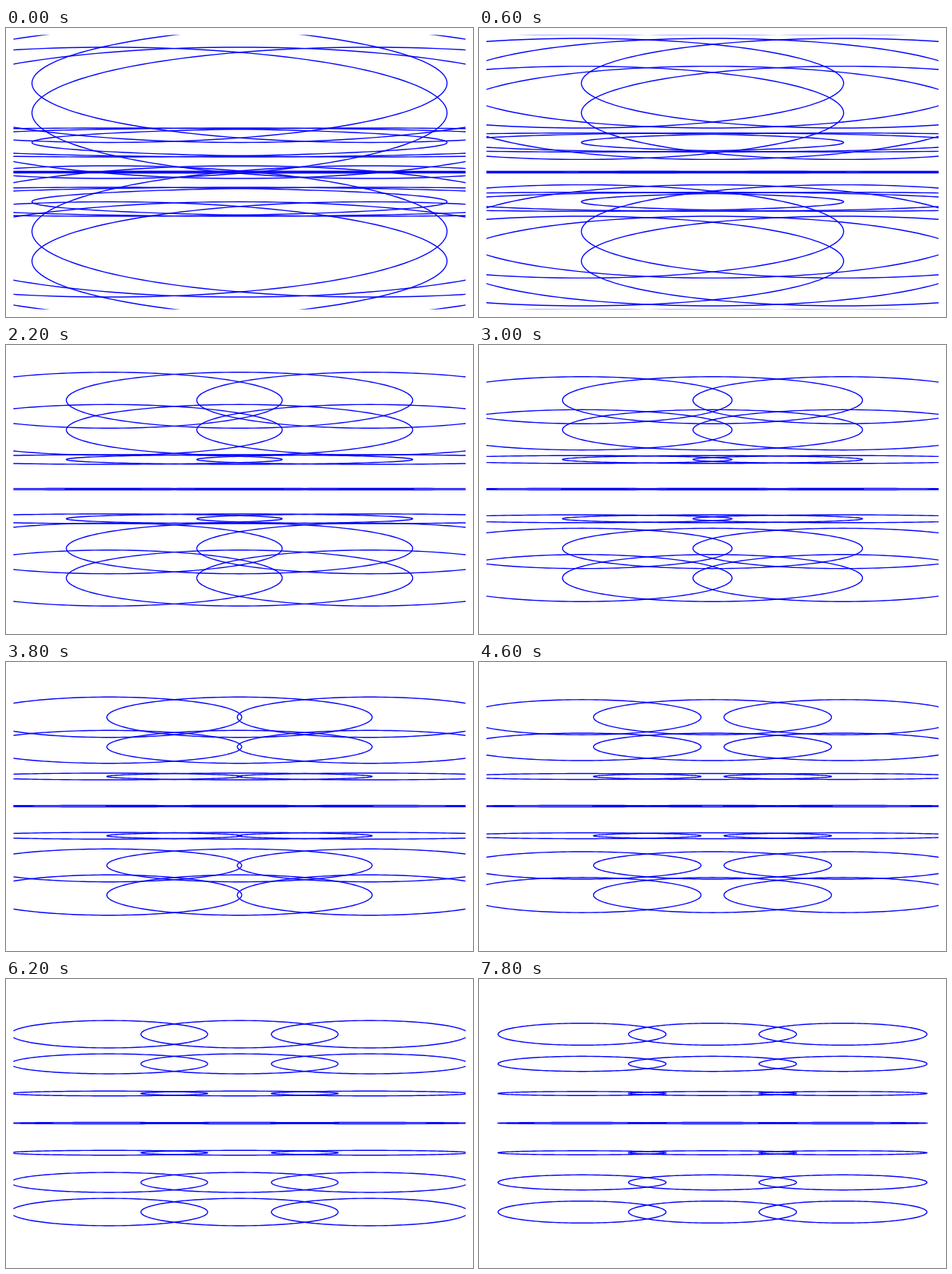
These frames come from a looping animation (630 by 390 pixels, 8 s). An HTML page with a canvas:

```html
<!DOCTYPE html>
<html lang="en">
<head>
<meta charset="utf-8">
<title>Ellipses</title>
<style>
  html, body { margin: 0; width: 100%; height: 100%; overflow: hidden; background: #fff; }
  canvas { display: block; }
</style>
</head>
<body>
<canvas id="stage" width="630" height="390"></canvas>
<script>
const ctx = document.getElementById('stage').getContext('2d');
const STEP = 200, STEPS = 40, SIDES = 160;
const CENTER = { x: 315, y: 194.5 }, GAP = { x: 176, y: 40 };

// Shared horizontal radius: its reciprocal grows almost linearly.
const radiusX = n =>
  1000 / (2.193 + 0.149 * n + 0.0002 * n * n + 0.52 * (1 - Math.exp(-n / 6.5)));

// Height to width ratio, by distance from the middle row.
const flatness = [
  n => 1 / radiusX(n),
  n => 0.024 + 0.0188 * Math.exp(-n / 7),
  n => 1 / (5.15 + 0.153 * n),
  n => 0.1753 * Math.exp(-0.0075 * n)
];

// Straight sides with mitred corners give the flat ellipses pointed tips.
function ellipse(cx, cy, rx, ry) {
  ctx.beginPath();
  for (let i = 0; i < SIDES; i++) {
    const angle = 2 * Math.PI * i / SIDES;
    ctx.lineTo(cx + rx * Math.cos(angle), cy + ry * Math.sin(angle));
  }
  ctx.closePath();
  ctx.stroke();
}

function draw(n) {
  const rx = radiusX(n);
  ctx.clearRect(0, 0, 630, 390);
  for (let row = -3; row <= 3; row++) {
    const ry = rx * flatness[Math.abs(row)](n);
    for (let col = -1; col <= 1; col++) {
      ellipse(CENTER.x + col * GAP.x, CENTER.y + row * GAP.y, rx, ry);
    }
  }
}

function frame(now) {
  start ??= now;
  draw(Math.floor((now - start) / STEP) % STEPS);
  requestAnimationFrame(frame);
}

ctx.rect(10, 9.5, 610, 370);
ctx.clip();
ctx.strokeStyle = '#00f';
ctx.lineWidth = 1.4;
let start;
draw(0);
requestAnimationFrame(frame);
</script>
</body>
</html>
```
